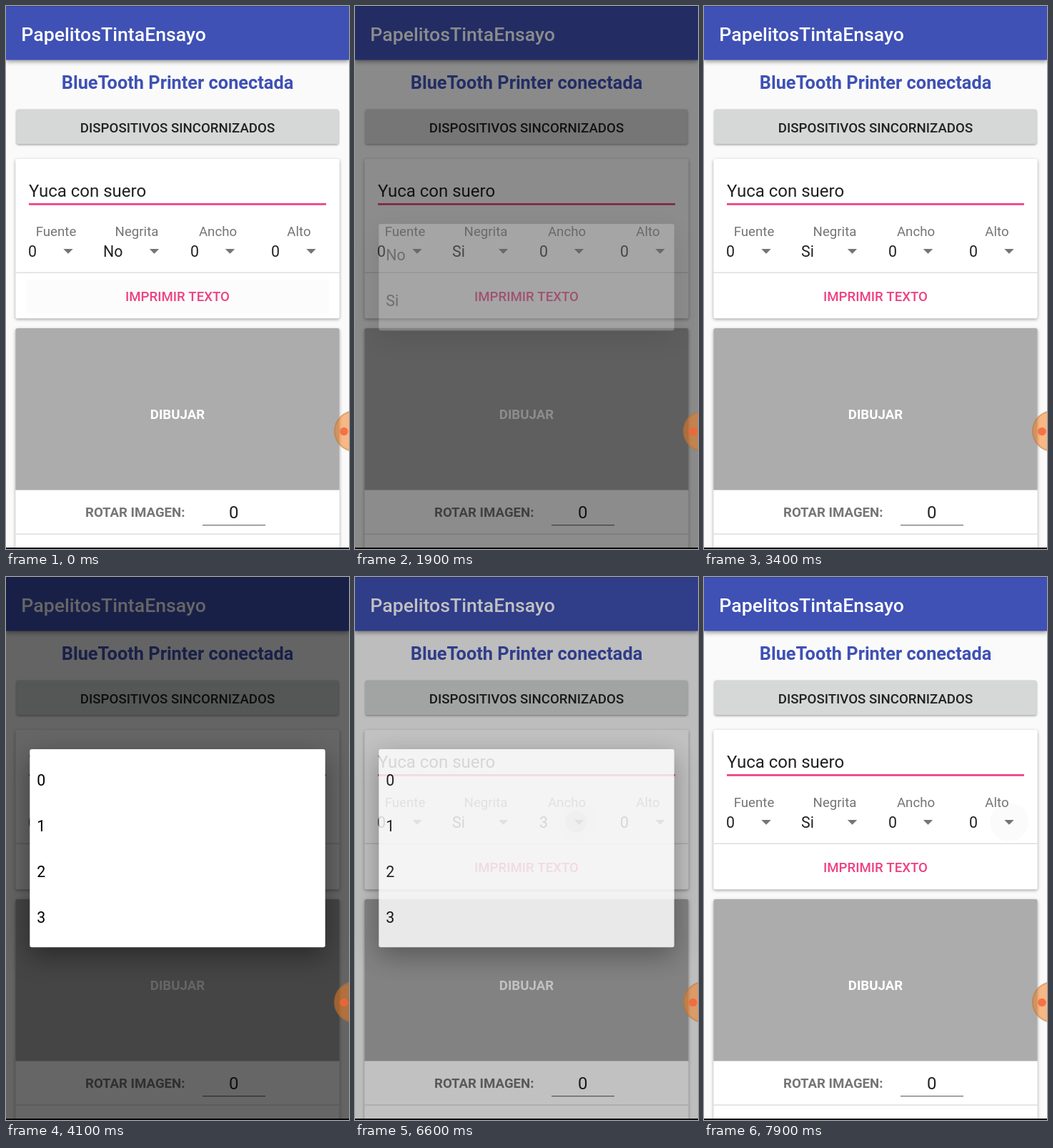
Write an HTML page with a canvas that moves like this. It is 480x760 px and loops after 8 s.

```html
<!DOCTYPE html>
<html lang="es">
<head>
<meta charset="utf-8">
<title>PapelitosTintaEnsayo</title>
<style>
  html, body { margin: 0; width: 100%; height: 100%; overflow: hidden; background: #fafafa; }
  canvas { display: block; }
</style>
</head>
<body>
<canvas id="stage" width="480" height="760"></canvas>
<script>
const W = 480, H = 760, LOOP = 8000, STEP = 100, FADE = 400;
const ACCENT = '#ee4182', PRIMARY = '#3f51b5', INK = '#212121', GREY = '#757575';
const FONT = 'Roboto, "Noto Sans", sans-serif';

const screen = document.getElementById('stage').getContext('2d');
const layer = document.createElement('canvas');
layer.width = W;
layer.height = H;
const popup = layer.getContext('2d');

const DIGITS = ['0', '1', '2', '3'];
const FIELDS = [
  { label: 'Fuente', center: 70, x: 31, caret: 87 },
  { label: 'Negrita', center: 183, x: 136, caret: 207.5 },
  { label: 'Ancho', center: 296.5, x: 258, caret: 313.5 },
  { label: 'Alto', center: 410, x: 371, caret: 427 }
];

// Touch, opening and closing time of each dropdown
const MENUS = [
  { field: 1, tap: 900, open: 900, close: 1700, top: 305, items: ['No', 'Si'] },
  { field: 2, tap: 3600, open: 3700, close: 4500, top: 241, items: DIGITS },
  { field: 2, tap: 6400, open: 6400, close: 7000, top: 241, items: DIGITS },
  { field: 3, tap: 7900, open: 8000, close: 9000, top: 241, items: DIGITS }
];

const CURSOR_ON = [[2900, 3400], [5700, 6200]];

const clamp = v => Math.max(0, Math.min(1, v));

function box(c, x, y, w, h, r, color, blur = 0, dy = 0, shade = 0) {
  c.save();
  c.shadowColor = `rgba(0,0,0,${shade})`;
  c.shadowBlur = blur;
  c.shadowOffsetY = dy;
  c.fillStyle = color;
  c.beginPath();
  c.roundRect(x, y, w, h, r);
  c.fill();
  c.restore();
}

function rect(x, y, w, h, color) {
  screen.fillStyle = color;
  screen.fillRect(x, y, w, h);
}

function disc(x, y, r, color) {
  screen.fillStyle = color;
  screen.beginPath();
  screen.arc(x, y, r, 0, 2 * Math.PI);
  screen.fill();
}

function text(c, str, x, y, size, color, weight = 400, align = 'left') {
  c.font = `${weight} ${size}px ${FONT}`;
  c.fillStyle = color;
  c.textAlign = align;
  c.fillText(str, x, y);
}

function caret(x) {
  screen.fillStyle = GREY;
  screen.beginPath();
  screen.moveTo(x - 6.7, 340);
  screen.lineTo(x + 6.7, 340);
  screen.lineTo(x, 346.8);
  screen.fill();
}

function drawRipple(t) {
  for (const m of MENUS) {
    const age = t - m.tap;
    if (age < 0 || t >= m.close) continue;
    const x = FIELDS[m.field].caret;
    disc(x, 343, 27, 'rgba(0,40,20,0.015)');
    if (age > 0) disc(x - 4, 343, Math.min(27, age * 0.075), 'rgba(0,0,0,0.13)');
  }
}

function drawHeader() {
  box(screen, 0, -10, W, 85.5, 0, PRIMARY, 6, 2, 0.4);
  rect(0, 0, W, 1, '#33439a');
  text(screen, 'PapelitosTintaEnsayo', 21.3, 49, 26.67, '#fff', 500);
  text(screen, 'BlueTooth Printer conectada', 240, 116, 25.33, PRIMARY, 700, 'center');
  box(screen, 14.5, 144.5, 451, 48.5, 2.7, '#d6d7d7', 3, 1.5, 0.35);
  text(screen, 'DISPOSITIVOS SINCORNIZADOS', 240, 176.6, 18.67, INK, 500, 'center');
}

function drawTextCard(t) {
  box(screen, 13.3, 214, 453.4, 223.3, 2.7, '#fff', 4, 1.5, 0.35);
  text(screen, 'Yuca con suero', 32, 267, 24, INK);
  rect(32, 276, 416, 2.7, ACCENT);
  if (CURSOR_ON.some(([a, b]) => t >= a && t < b)) rect(196.7, 240.6, 2.7, 33, ACCENT);

  drawRipple(t);
  const values = ['0', t < 1800 ? 'No' : 'Si', t >= 4600 && t < 7100 ? '3' : '0', '0'];
  FIELDS.forEach((f, i) => {
    text(screen, f.label, f.center, 321.6, 18.67, GREY, 400, 'center');
    text(screen, values[i], f.x, 351, 21.33, INK);
    caret(f.caret);
  });

  rect(13.3, 372.5, 453.4, 1.3, '#d9d9d9');
  if (t < 300) box(screen, 28, 383, 424, 47, 2.7, 'rgba(0,40,40,0.012)');
  text(screen, 'IMPRIMIR TEXTO', 240, 413.1, 18.67, ACCENT, 500, 'center');
}

function drawImageCard() {
  box(screen, 13.3, 451, 453.4, 330, 2.7, '#fff', 4, 1.5, 0.35);
  box(screen, 13.3, 451, 453.4, 226.5, [2.7, 2.7, 0, 0], '#acacac');
  text(screen, 'DIBUJAR', 240, 578.2, 18.67, '#fff', 700, 'center');
  text(screen, 'ROTAR IMAGEN:', 111, 715, 18.67, GREY, 700);
  text(screen, '0', 318.7, 717, 24, INK, 400, 'center');
  rect(275, 726, 88, 1.2, '#6f6f6f');
  rect(13.3, 738.4, 453.4, 1.3, '#d9d9d9');
}

function drawMenu(m, alpha) {
  const h = m.items.length * 64 + 21.3;
  popup.clearRect(0, 0, W, H);
  box(popup, 33.3, m.top, 413.4, h, 2.7, '#fff', 36, 12, 0.4);
  m.items.forEach((s, i) => text(popup, s, 43.3, m.top + 50.5 + i * 64, 21.33, '#000'));
  screen.globalAlpha = alpha;
  screen.drawImage(layer, 0, 0);
  screen.globalAlpha = 1;
}

function drawBubble() {
  disc(488, 595, 29, 'rgba(245,125,30,0.52)');
  screen.strokeStyle = 'rgba(130,95,60,0.22)';
  screen.lineWidth = 2;
  screen.beginPath();
  screen.arc(488, 595, 28, 0, 2 * Math.PI);
  screen.stroke();
  disc(473, 595.5, 5.8, 'rgba(243,100,55,0.82)');
}

function draw(t) {
  rect(0, 0, W, H, '#fafafa');
  drawHeader();
  drawTextCard(t);
  drawImageCard();

  const m = MENUS.find(m => t > m.open && t < m.close + FADE);
  if (m) {
    const p = clamp((t - m.open) / FADE), q = clamp((t - m.close) / FADE);
    const dim = 0.6 * Math.pow(p, 1.3) * (1 - q * q);
    const alpha = (1 - Math.pow(1 - p, 2.5)) * Math.pow(1 - q, 2.2);
    rect(0, 0, W, H, `rgba(0,0,0,${dim})`);
    drawMenu(m, alpha);
  }

  drawBubble();
  rect(0, 758, W, 2, '#000');
}

const start = performance.now();
function tick() {
  const t = (performance.now() - start) % LOOP;
  draw(Math.floor(t / STEP) * STEP);
  requestAnimationFrame(tick);
}
tick();
</script>
</body>
</html>
```
